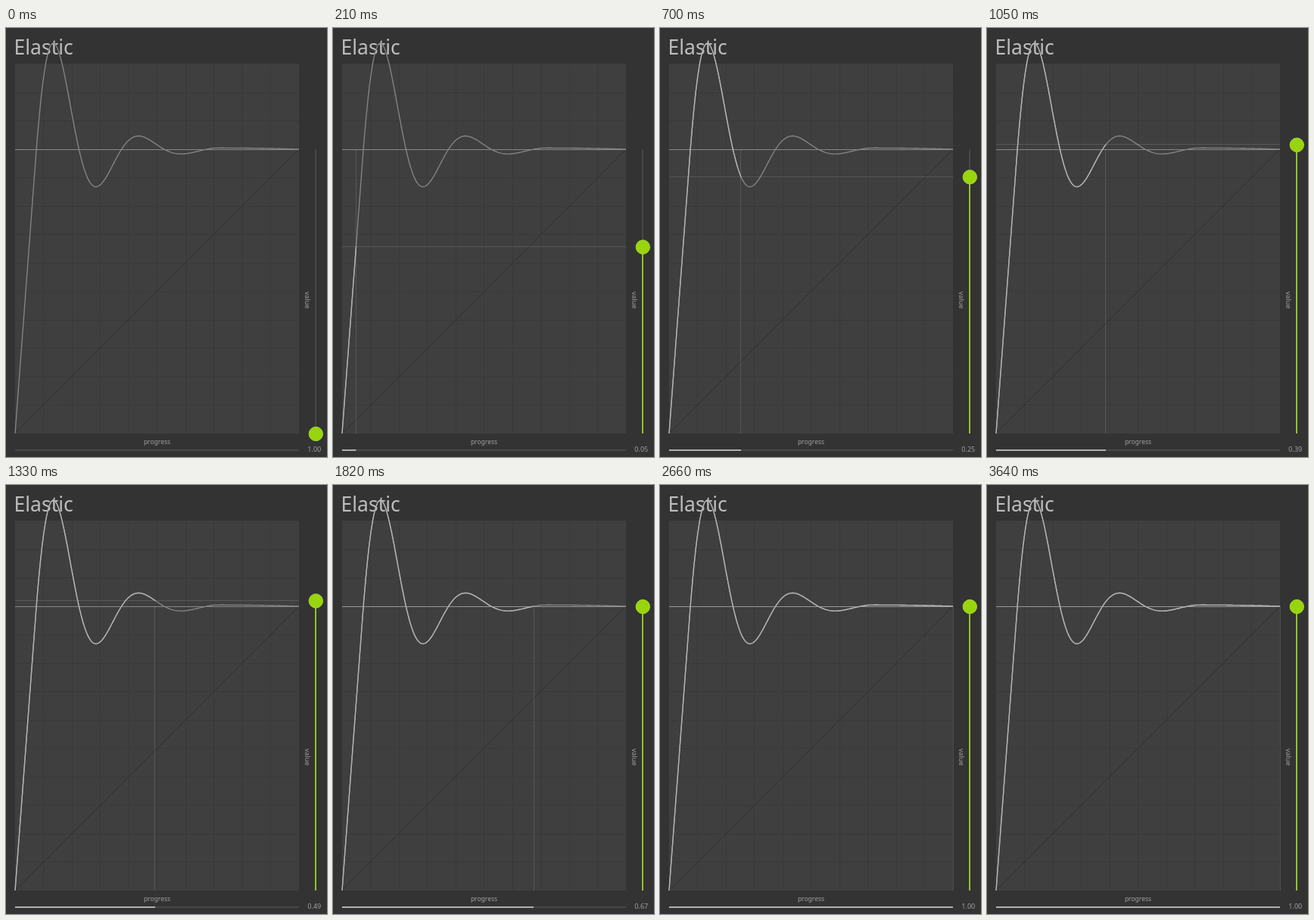
Animation of 424 by 566 pixels, one loop 3920 ms. Source, as an HTML page with a canvas:

```html
<!DOCTYPE html>
<html>
<head>
<meta charset="utf-8">
<title>Elastic</title>
<style>
html, body { margin: 0; height: 100%; overflow: hidden; background: #333; }
canvas { display: block; }
</style>
</head>
<body>
<canvas id="stage" width="424" height="566"></canvas>
<script>
const ctx = document.getElementById('stage').getContext('2d');
const LOOP = 3920, STEP = 70;
const LEFT = 12, BASE = 535, SIZE = 375, TOP = 47, RIGHT = LEFT + SIZE, ONE = BASE - SIZE;
const FONT = '"Noto Sans", "Open Sans", sans-serif';

// Slightly uneven pace: [time in ms, progress]
const PACE = [[70, 0], [210, .0493], [700, .2533], [1330, .4933], [1820, .6747], [2240, .841], [2660, 1]];

function progressAt(t) {
  if (t <= PACE[0][0]) return 0;
  const i = PACE.findIndex(k => t <= k[0]);
  if (i < 0) return 1;
  const [t0, p0] = PACE[i - 1], [t1, p1] = PACE[i];
  return p0 + (p1 - p0) * (t - t0) / (t1 - t0);
}

// Elastic ease-out with a straight start and a settled tail
function elastic(p) {
  if (p < .075) return p / .075;
  if (p > .705) {
    const q = (p - .705) / .295;
    return 1 + .0045 * (1 - q) * (1 + 1.2 * q);
  }
  return 1 + 2 ** (-10 * p) * Math.sin((p - .075) * 2 * Math.PI / .3);
}

const px = p => LEFT + p * SIZE;
const py = v => BASE - v * SIZE;

function line(x1, y1, x2, y2, color, width = 1) {
  ctx.strokeStyle = color;
  ctx.lineWidth = width;
  ctx.beginPath();
  ctx.moveTo(x1, y1);
  ctx.lineTo(x2, y2);
  ctx.stroke();
}

function curve(end, color) {
  ctx.strokeStyle = color;
  ctx.lineWidth = 1.35;
  ctx.lineJoin = 'round';
  ctx.beginPath();
  ctx.moveTo(LEFT, BASE);
  for (let p = 0; p < end; p += .0025) ctx.lineTo(px(p), py(elastic(p)));
  ctx.lineTo(px(end), py(elastic(end)));
  ctx.stroke();
}

function label(str, x, y, size, color, align = 'center') {
  ctx.font = size + 'px ' + FONT;
  ctx.textAlign = align;
  ctx.fillStyle = color;
  ctx.fillText(str, x, y);
}

function drawChart() {
  ctx.fillStyle = '#333';
  ctx.fillRect(0, 0, 424, 566);
  ctx.fillStyle = '#3f3f3f';
  ctx.fillRect(LEFT, TOP, SIZE, BASE - TOP);
  for (let i = 1; i < 10; i++) {
    const x = Math.floor(px(i / 10)) + .5;
    line(x, TOP, x, BASE, '#393939');
  }
  for (let i = 1; i < 13; i++) {
    const y = Math.floor(py(i / 10)) + .5;
    line(LEFT, y, RIGHT, y, '#393939');
  }
  line(LEFT, BASE, RIGHT, ONE, '#2f2f2f');
  line(LEFT, ONE + .5, RIGHT, ONE + .5, '#888');
  line(409, ONE, 409, BASE, '#474747', 2);
  line(LEFT, 557, RIGHT, 557, '#474747', 2);

  label('Elastic', 10.5, 35, 26.5, '#bdbdbd', 'left');
  label('progress', 199.5, 549, 8.5, '#a0a0a0');
  ctx.save();
  ctx.translate(394.5, 359);
  ctx.rotate(Math.PI / 2);
  label('value', 0, 0, 9, '#a0a0a0');
  ctx.restore();
}

function draw(t) {
  const p = progressAt(t), x = px(p), y = py(elastic(p));
  drawChart();
  curve(1, '#858585');
  if (p > 0) {
    const cross = 'rgba(255,255,255,.13)';
    line(LEFT, Math.floor(y) + .5, RIGHT, Math.floor(y) + .5, cross);
    line(Math.floor(x) + .5, ONE, Math.floor(x) + .5, BASE, cross);
    curve(p, '#b4b4b4');
    line(LEFT, 557, x, 557, '#b0b0b0', 2);
    line(409, BASE, 409, y, '#8fc426', 2);
  }
  ctx.fillStyle = '#98d50c';
  ctx.strokeStyle = '#a2d733';
  ctx.lineWidth = 1;
  ctx.beginPath();
  ctx.arc(409.3, y + .5, 9.2, 0, 7);
  ctx.fill();
  ctx.stroke();
  // The counter still shows the finished run until the next one starts
  label((t < STEP ? 1 : p).toFixed(2), 407.3, 559, 9, '#a0a0a0');
}

const start = performance.now();
function tick() {
  const t = (performance.now() - start) % LOOP;
  draw(Math.floor(t / STEP) * STEP);
  requestAnimationFrame(tick);
}
tick();
</script>
</body>
</html>
```
